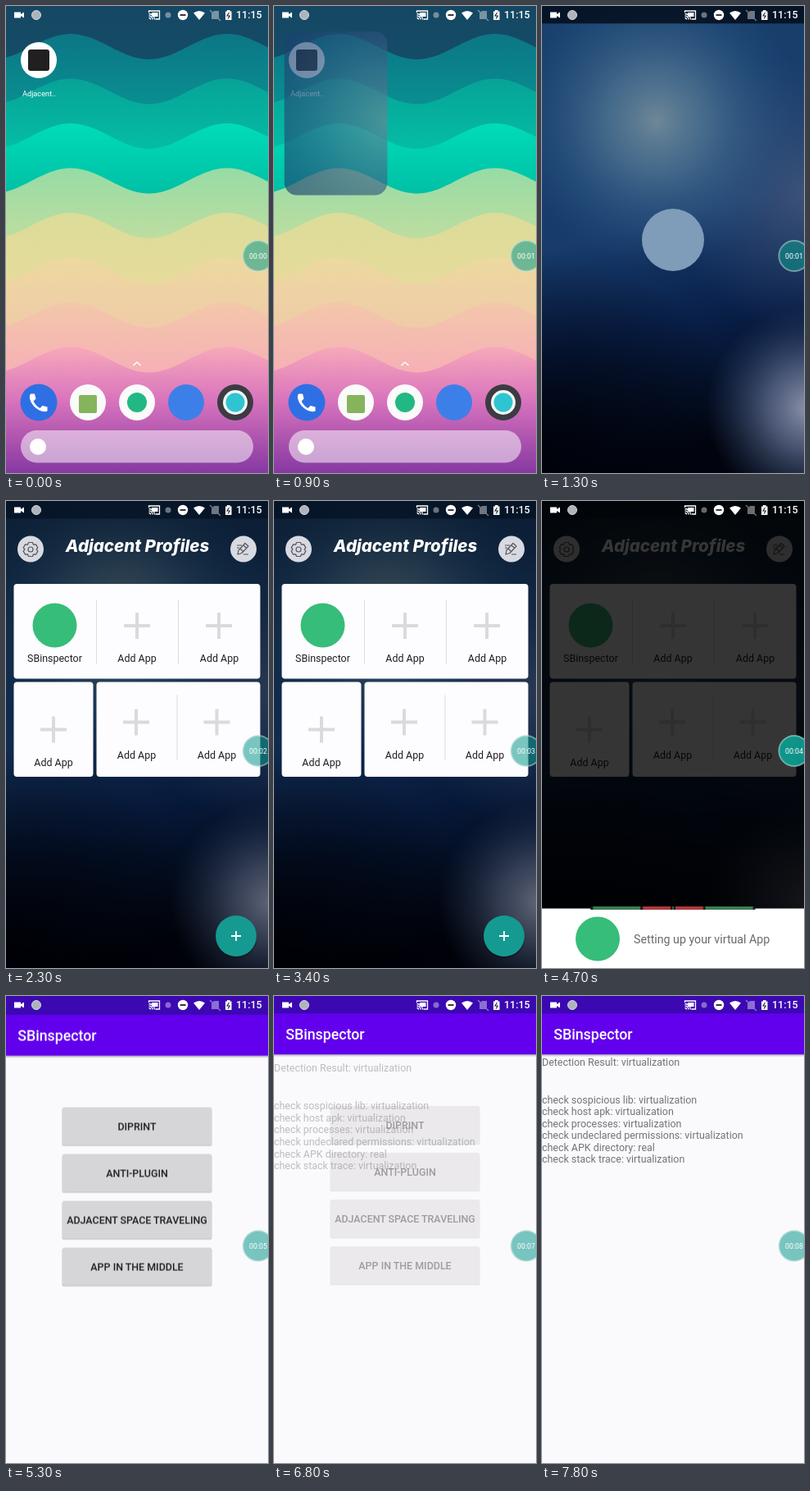
Recreate the animation shown at these times as an HTML page. Size 320 px wide and 569 px high, loop 8 s.

```html
<!DOCTYPE html>
<html lang="en">
<head>
<meta charset="utf-8">
<title>Virtual environment check</title>
<style>
html, body { margin: 0; width: 100%; height: 100%; overflow: hidden; background: #000; }
svg.stage { display: block; width: 100vw; height: 100vh; font: 12.44px Roboto, sans-serif; }
.mid { text-anchor: middle; }
.medium { font-weight: 500; }
.anim { animation: 8s linear infinite both; }

.splash { animation-name: reveal; }
.mark { animation-name: mark; }
.home { animation-name: home; }
.dim, .sheet { animation-name: dialog; }
.bar { animation-name: bar; transform-origin: 160px 496px; }
.bar.b { animation-name: barB; }
.bar.c { animation-name: barC; }
.app { animation-name: open; }
.ripple { animation-name: ripple; transform-origin: 160px 214px; }
.menu { animation-name: menu; }
.result { animation-name: result; }
.solid { animation-name: solid; }
.clock { animation: clock 8s step-end infinite both; }

@keyframes reveal {
  0%, 9.9% { opacity: 0; clip-path: inset(44px 258px 481px 18px round 22px); }
  12% { opacity: 1; }
  14.5%, 100% { opacity: 1; clip-path: inset(0 0 0 0 round 0); }
}
@keyframes mark { 0%, 13% { opacity: 0 } 16%, 22.5% { opacity: 1 } 26.5%, 100% { opacity: 0 } }
@keyframes home { 0%, 21.5% { opacity: 0 } 28%, 100% { opacity: 1 } }
@keyframes dialog { 0%, 42.5% { opacity: 0 } 51.5%, 100% { opacity: 1 } }
/* Quadratic growth from the centre */
@keyframes bar {
  0%, 43.8% { transform: scaleX(0); animation-timing-function: cubic-bezier(.333,0,.667,.333); }
  65%, 100% { transform: scaleX(1); }
}
@keyframes barB {
  0%, 49.5% { transform: scaleX(0); animation-timing-function: cubic-bezier(.333,0,.667,.333); }
  65%, 100% { transform: scaleX(1); }
}
@keyframes barC {
  0%, 56.6% { transform: scaleX(0); animation-timing-function: cubic-bezier(.333,0,.667,.333); }
  65%, 100% { transform: scaleX(1); }
}
@keyframes open {
  0%, 64.3% { opacity: 0; transform: translateY(20px); }
  66.2% { opacity: 1; transform: translateY(1.6px); }
  68%, 100% { opacity: 1; transform: none; }
}
@keyframes ripple {
  0%, 78.6% { opacity: 0; transform: scale(.1); }
  79% { opacity: 1; }
  82% { opacity: 1; transform: none; }
  85%, 100% { opacity: 0; transform: none; }
}
@keyframes menu { 0%, 83% { opacity: 1 } 86.5%, 100% { opacity: 0 } }
@keyframes result {
  0%, 83% { opacity: 0; transform: translateY(14px); }
  87.5%, 100% { opacity: 1; transform: none; }
}
@keyframes solid { 0%, 43% { opacity: .55 } 52%, 63.5% { opacity: .95 } 65.5%, 100% { opacity: .55 } }
@keyframes clock {
  0% { transform: none }
  10% { transform: translateY(-20px) }
  22.5% { transform: translateY(-40px) }
  35% { transform: translateY(-60px) }
  47.5% { transform: translateY(-80px) }
  60% { transform: translateY(-100px) }
  72.5% { transform: translateY(-120px) }
  85% { transform: translateY(-140px) }
  97.5%, 100% { transform: translateY(-160px) }
}
</style>
</head>
<body>
<svg class="stage" viewBox="0 0 320 569" preserveAspectRatio="none">
  <defs>
    <linearGradient id="sky" x2="0" y2="1"><stop stop-color="#154763"/><stop offset="1" stop-color="#0d7483"/></linearGradient>
    <linearGradient id="base" x1=".1" y1="0" x2=".25" y2="1">
      <stop stop-color="#19406c"/><stop offset=".5" stop-color="#173b6c"/><stop offset=".72" stop-color="#09204a"/><stop offset="1" stop-color="#01040f"/>
    </linearGradient>
    <radialGradient id="glow" gradientUnits="userSpaceOnUse" cx="140" cy="140" r="180">
      <stop stop-color="#6d8797"/><stop offset=".35" stop-color="#4d7391" stop-opacity=".8"/><stop offset="1" stop-color="#235384" stop-opacity="0"/>
    </radialGradient>
    <radialGradient id="haze" gradientUnits="userSpaceOnUse" cx="325" cy="490" r="125">
      <stop stop-color="#8d94ab"/><stop offset=".4" stop-color="#66769a" stop-opacity=".7"/><stop offset="1" stop-color="#334f7c" stop-opacity="0"/>
    </radialGradient>
    <radialGradient id="side" gradientUnits="userSpaceOnUse" cx="325" cy="230" r="170">
      <stop stop-color="#47597c" stop-opacity=".8"/><stop offset="1" stop-color="#344c74" stop-opacity="0"/>
    </radialGradient>
    <radialGradient id="corner" gradientUnits="userSpaceOnUse" cx="0" cy="560" r="260">
      <stop stop-color="#00020a"/><stop offset="1" stop-color="#00020a" stop-opacity="0"/>
    </radialGradient>
    <linearGradient id="shade" x2="0" y2="1"><stop stop-color="#000" stop-opacity=".5"/><stop offset=".6" stop-color="#000" stop-opacity=".22"/><stop offset="1" stop-color="#000" stop-opacity=".35"/></linearGradient>
    <linearGradient id="drop" x2="0" y2="1"><stop stop-opacity=".28"/><stop offset="1" stop-opacity="0"/></linearGradient>
    <path id="plus" d="M-16 0H16M0-16V16" stroke="#dad9db" stroke-width="4"/>
    <clipPath id="barClip"><path d="M0 494.5h320v3.5H0z"/></clipPath>
    <clipPath id="buttonClip"><rect x="69" y="191" width="182" height="46" rx="2"/></clipPath>
    <clipPath id="clockClip"><path d="M290 294h30v20h-30z"/></clipPath>
  </defs>

  <g class="launcher">
    <rect width="320" height="569" fill="url(#sky)"/>
    <g id="waves"></g>
    <circle cx="40" cy="66" r="22" fill="#fff"/>
    <rect x="27" y="53" width="26" height="26" rx="3" fill="#221f21"/>
    <text class="mid" x="40.5" y="110" font-size="9.2" fill="#fff">Adjacent..</text>
    <path d="M155.500 438l4.500-4 4.500 4" fill="none" stroke="#fff" stroke-width="1.6"/>
    <circle cx="40" cy="483" r="22.500" fill="#2f6fe4"/>
    <path d="M31 472.500h5l1.500 6-3 3q3 6 8 8.500l3-3 6 1.500v5q-4 2-10-1-9-5-11.500-14-.8-4 1-6z" fill="#fff" transform="translate(-1)"/>
    <circle cx="100" cy="483" r="22" fill="#fafafa"/>
    <rect x="89" y="474" width="22" height="22" rx="2" fill="#86b45c"/>
    <circle cx="160" cy="483" r="22" fill="#fafafa"/>
    <circle cx="160" cy="483" r="12" fill="#22b884"/>
    <circle cx="220" cy="483" r="22" fill="#3d7fe8"/>
    <circle cx="280" cy="483" r="22" fill="#3c3b42"/>
    <circle cx="280" cy="483" r="15" fill="#f1f5f6"/>
    <circle cx="280" cy="483" r="11.500" fill="#2fc4d2"/>
    <rect x="18" y="517" width="284" height="39.500" rx="19.700" fill="#fff" fill-opacity=".52"/>
    <circle cx="39" cy="537" r="10" fill="#fff"/>
  </g>

  <g class="splash anim">
    <g id="blur">
      <rect width="320" height="569" fill="url(#base)"/>
      <rect width="320" height="569" fill="url(#side)"/>
      <rect width="320" height="569" fill="url(#glow)"/>
      <rect width="320" height="569" fill="url(#corner)"/>
      <rect width="320" height="569" fill="url(#haze)"/>
    </g>
    <circle class="mark anim" cx="160" cy="285" r="38" fill="#7f9cb8"/>
    <rect width="320" height="21.300" fill="#000814" fill-opacity=".78"/>
  </g>

  <g class="home anim">
    <rect y="21" width="320" height="548" fill="url(#shade)"/>
    <text class="mid" x="160.500" y="62" font-family="Inter, sans-serif" font-size="20.500" font-weight="800" font-style="italic" fill="#fff">Adjacent Profiles</text>
    <g fill="#d8d9e1"><circle cx="30" cy="58.500" r="16"/><circle cx="290" cy="58.500" r="16"/></g>
    <g fill="none" stroke="#55565e" stroke-width="1.200" stroke-linejoin="round">
      <path d="M27.500 50.500h5l1 2.700 3-.3 2.300 4-1.700 2.100 1.700 2.100-2.300 4-3-.3-1 2.700h-5l-1-2.700-3 .3-2.300-4 1.700-2.100-1.700-2.100 2.300-4 3 .3z"/>
      <circle cx="30" cy="59" r="3"/>
      <path d="M283 65l1-5 8-8.500 4 3.500-8 8.500zM286 58l4 4M290 54l4 3.500M282 57h3M282 54h6M290 65h6"/>
    </g>
    <g fill="#fdfcfe">
      <rect x="9.500" y="101" width="301" height="115.500" rx="4"/>
      <rect x="9.500" y="220.500" width="97" height="115.500" rx="4"/>
      <rect x="110.500" y="220.500" width="200" height="115.500" rx="4"/>
    </g>
    <path d="M110.500 120v79M210.500 120v79M209 236.500v79" stroke="#dcdbdd"/>
    <circle cx="59.500" cy="151.500" r="27" fill="#36bd79"/>
    <use href="#plus" x="160" y="152"/><use href="#plus" x="260" y="152"/>
    <use href="#plus" x="58" y="278.500"/><use href="#plus" x="159" y="269.500"/><use href="#plus" x="257.500" y="269.500"/>
    <g class="mid" fill="#202022">
      <text x="59.500" y="196">SBinspector</text>
      <text x="160" y="196">Add App</text><text x="260.500" y="196">Add App</text>
      <text x="58" y="323">Add App</text>
      <text x="159.500" y="314">Add App</text><text x="257.500" y="314">Add App</text>
    </g>
    <circle cx="281" cy="532" r="25.500" opacity=".25"/>
    <circle cx="281" cy="530" r="25" fill="#159a92"/>
    <path d="M275 530h12M281 524v12" stroke="#fff" stroke-width="1.800"/>
  </g>

  <rect class="dim anim" width="320" height="569" fill="#000" fill-opacity=".79"/>
  <g class="sheet anim">
    <rect y="496.500" width="320" height="73" fill="#fff"/>
    <circle cx="68" cy="533.500" r="27" fill="#36bd79"/>
    <text x="112" y="538.700" font-size="14.220" fill="#69696b">Setting up your virtual App</text>
  </g>
  <g clip-path="url(#barClip)" stroke="#161616" stroke-width="2.500">
    <rect class="bar anim" x="-39" y="485" width="398" height="22" fill="#3a7d55" vector-effect="non-scaling-stroke"/>
    <rect class="bar b anim" x="53" y="485" width="214" height="22" fill="#ad383e" vector-effect="non-scaling-stroke"/>
    <rect class="bar c anim" x="129" y="485" width="62" height="22" fill="#3a7d55" vector-effect="non-scaling-stroke"/>
  </g>

  <g class="app anim">
    <rect y="-20" width="320" height="610" fill="#faf9fb"/>
    <rect y="71" width="320" height="3.500" fill="url(#drop)"/>
    <rect y="-20" width="320" height="91.200" fill="#6200ee"/>
    <rect y="-20" width="320" height="41.300" fill="#3b08b2"/>
    <text class="medium" x="14.200" y="53" font-size="17.780" fill="#fff">SBinspector</text>
    <g class="menu anim">
      <g id="buttons"></g>
      <g clip-path="url(#buttonClip)"><circle class="ripple anim" cx="160" cy="214" r="95" fill="#000" fill-opacity=".14"/></g>
    </g>
    <g class="result anim" id="result" fill="#747375"></g>
  </g>

  <g class="status" fill="#fff">
    <path d="M10 7.500h8v2.500l4-2.500v7l-4-2.500v2.500h-8z"/>
    <circle cx="37" cy="11" r="5.500" fill="#aeb4bb" stroke="#d3d7da"/>
    <path d="M174.500 8V6h13v10h-5M174.500 14.500a2 2 0 0 1 2 2M174.500 12a4.500 4.500 0 0 1 4.500 4.500M174.500 9.500a7 7 0 0 1 7 7" fill="none" stroke="#fff" stroke-width="1.300"/>
    <rect x="178" y="8" width="7.500" height="5"/>
    <circle cx="198" cy="11" r="3.500" opacity=".4"/>
    <circle cx="216" cy="11" r="6.200"/>
    <path d="M212.500 11h7" stroke="#222" stroke-width="1.800"/>
    <path d="M229 8.500q7-5 14 0l-7 8.500z"/>
    <g opacity=".42"><path d="M254 6h6v10h-9V9z"/><path d="M249 5l13 13" stroke="#fff" stroke-width="1.500"/></g>
    <path d="M268 6.500h2V5h3.500v1.500h2v10.500h-7.500z"/>
    <path d="M272.500 8l-2.500 4h3.200l-2 3.500" fill="none" stroke="#222" stroke-width="1.100"/>
    <text class="medium" x="281" y="15.400">11:15</text>
  </g>

  <g class="bubble">
    <g class="solid anim">
      <circle cx="308" cy="304.500" r="19" fill="#0e9a8f"/>
    </g>
    <circle cx="308" cy="304.500" r="18.600" fill="none" stroke="#e4f1ef" stroke-opacity=".42" stroke-width="2"/>
    <g clip-path="url(#clockClip)"><g class="clock" id="clock" fill="#fff" font-size="8.800"></g></g>
  </g>
</svg>
<script>
const NS = "http://www.w3.org/2000/svg";
const $ = id => document.getElementById(id);

function add(parent, tag, attrs, text) {
  const el = document.createElementNS(NS, tag);
  for (const key in attrs) el.setAttribute(key, attrs[key]);
  if (text) el.textContent = text;
  return parent.appendChild(el);
}

// Wallpaper: each layer has a sine edge and its own vertical fade
const tones = [
  ["#0c7685", "#098f91"], ["#07a397", "#04bda5"], ["#00dcb7", "#00bfa5"],
  ["#95dca5", "#bfdda0"], ["#dcdc99", "#e6db9b"], ["#ecd9a0", "#f0cba8"],
  ["#f3c8aa", "#f6afb6"], ["#f7a9ba", "#8638a2"]
];
tones.forEach(([top, end], i) => {
  const crest = 34 + i * 54.5, last = i === tones.length - 1;
  const grad = add($("waves"), "linearGradient", {
    id: "tone" + i, gradientUnits: "userSpaceOnUse",
    x1: 0, x2: 0, y1: crest, y2: last ? 569 : crest + 88
  });
  add(grad, "stop", { "stop-color": top });
  if (last) add(grad, "stop", { offset: .42, "stop-color": "#d974bd" });
  add(grad, "stop", { offset: 1, "stop-color": end });
  let d = "M0 569";
  for (let x = 0; x <= 320; x += 4) {
    const y = crest + 15.5 * (1 - Math.cos((x - 79) / 191 * 2 * Math.PI));
    d += `L${x} ${y.toFixed(1)}`;
  }
  add($("waves"), "path", { d: d + "V569z", fill: `url(#tone${i})` });
});

["DIPRINT", "ANTI-PLUGIN", "ADJACENT SPACE TRAVELING", "APP IN THE MIDDLE"].forEach((label, i) => {
  const y = 134 + i * 57, box = { x: 69, width: 182, height: 46, rx: 2 };
  add($("buttons"), "rect", { ...box, x: 68.5, width: 183, y: y + 1.2, fill: "#000", "fill-opacity": .2 });
  add($("buttons"), "rect", { ...box, y, fill: "#d6d5d7" });
  add($("buttons"), "text", { x: 160, y: y + 27.5, class: "mid medium", fill: "#1f1f20" }, label);
});

const checks = [
  "sospicious lib: virtualization", "host apk: virtualization", "processes: virtualization",
  "undeclared permissions: virtualization", "APK directory: real", "stack trace: virtualization"
];
add($("result"), "text", { x: 0, y: 84.5 }, "Detection Result: virtualization");
checks.forEach((line, i) => add($("result"), "text", { x: 0, y: 130.6 + i * 14.55 }, "check " + line));

for (let s = 0; s <= 8; s++) {
  add($("clock"), "text", { x: 308, y: 307.8 + s * 20, class: "mid" }, "00:0" + s);
}
</script>
</body>
</html>
```
